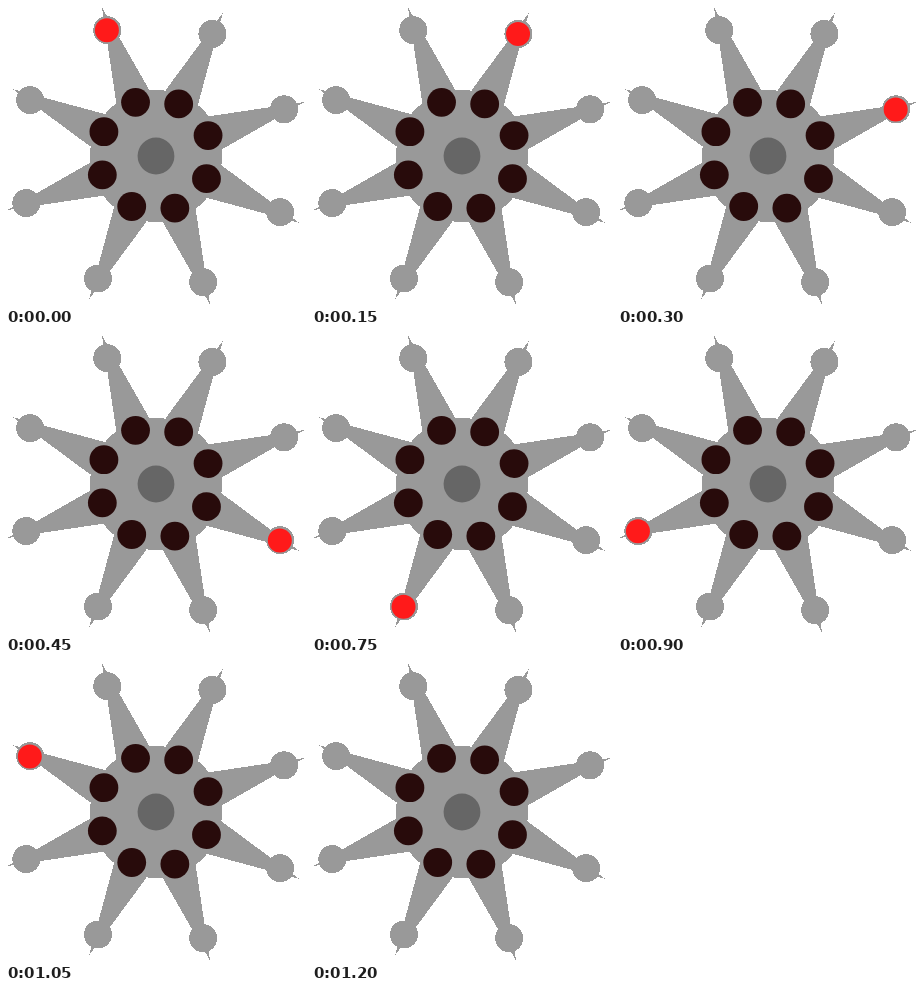
Animation of 300 by 300 pixels, one loop 1350 ms. Source, as an HTML page:

```html
<!DOCTYPE html>
<html>
<head>
<meta charset="utf-8">
<style>
html, body { margin: 0; width: 100%; height: 100%; overflow: hidden; background: #fff; }
svg { display: block; width: 300px; height: 300px; }
</style>
</head>
<body>
<svg id="stage" viewBox="0 0 300 300"></svg>
<script>
const ARMS = 8, STEP = 150, FIRST_ANGLE = -110.4;
const stage = document.getElementById('stage');

function add(name, attrs) {
  const el = document.createElementNS('http://www.w3.org/2000/svg', name);
  for (const key in attrs) el.setAttribute(key, attrs[key]);
  return stage.appendChild(el);
}
const disc = ([cx, cy], r, fill, rendering = 'auto') =>
  add('circle', { cx, cy, r, fill, 'shape-rendering': rendering });

// Evenly spaced points on an ellipse, clockwise from the first arm
const ring = (cx, cy, rx, ry) => Array.from({ length: ARMS }, (_, i) => {
  const angle = (FIRST_ANGLE + i * 360 / ARMS) * Math.PI / 180;
  return [cx + rx * Math.cos(angle), cy + ry * Math.sin(angle)];
});

// Equal spikes around the hub, each ending in a round knob
ring(149.2, 150.2, 137.5, 134.5).forEach((knob, i) => {
  add('path', {
    d: 'M96 1.5L110.3 97L144.5 86Z', fill: '#999',
    transform: `rotate(${i * 360 / ARMS} 150 150)`, 'shape-rendering': 'crispEdges'
  });
  disc(knob, 14, '#999', 'crispEdges');
});
disc([150, 150], 66, '#999', 'crispEdges');
disc([150, 150], 18.4, '#666');
ring(149.2, 149.2, 56.4, 56.4).forEach(hole => disc(hole, 14.4, '#280b0b'));
const lamps = ring(148.8, 150.4, 137.5, 134.5).map(spot => disc(spot, 12, '#ff1a1a'));

// One lamp at a time, clockwise, then one dark step
const start = performance.now();
function draw() {
  const phase = Math.floor((performance.now() - start) / STEP) % (ARMS + 1);
  lamps.forEach((lamp, i) => lamp.setAttribute('visibility', i === phase ? 'visible' : 'hidden'));
  requestAnimationFrame(draw);
}
draw();
</script>
</body>
</html>
```
